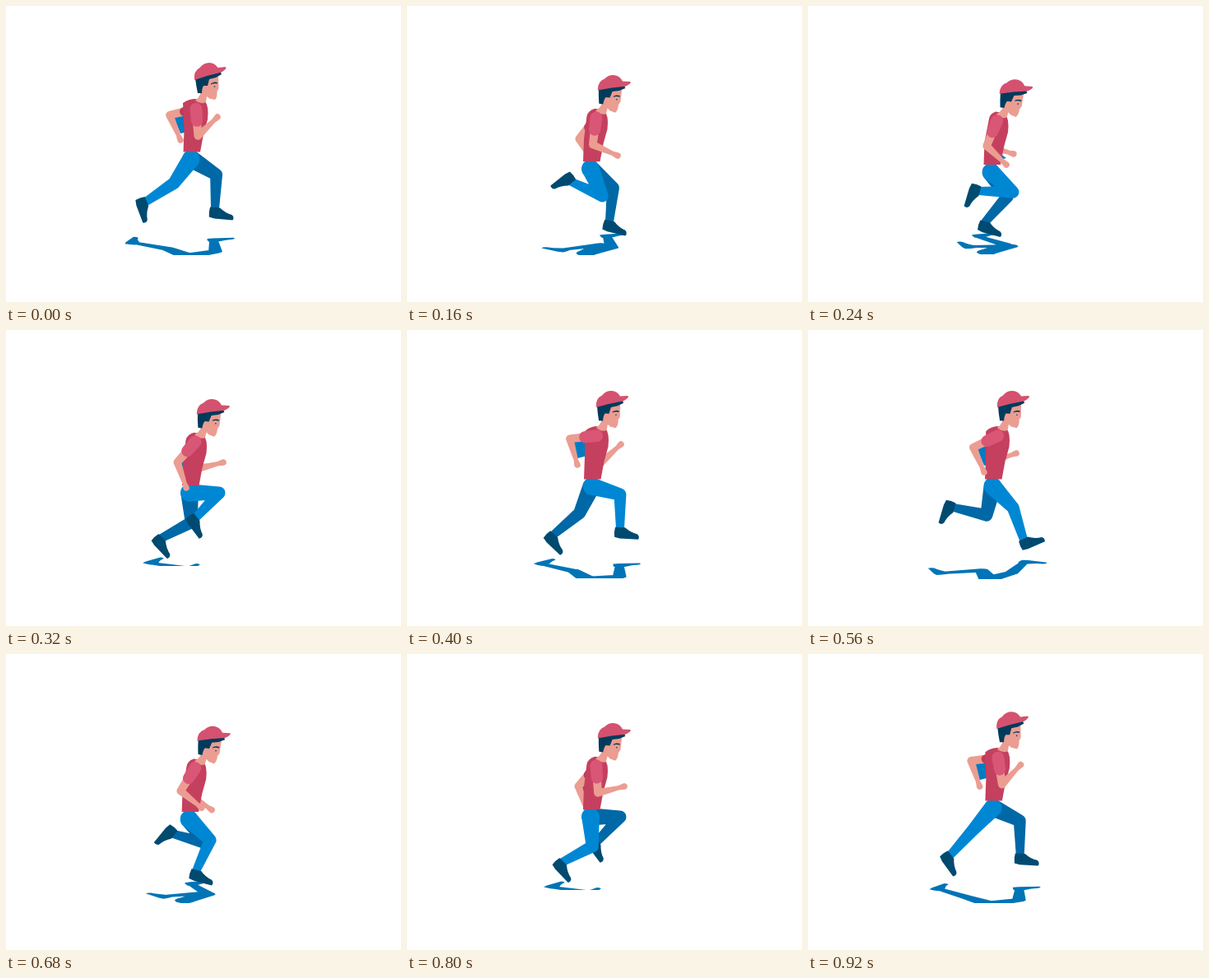
Recreate the animation shown at these times as an HTML page. Size 480 by 360 pixels, loop 0.96 s.

```html
<!DOCTYPE html>
<html lang="en">
<head>
<meta charset="utf-8">
<title>Runner</title>
<style>
html, body { margin: 0; width: 100%; height: 100%; overflow: hidden; background: #fff; }
svg { display: block; width: 100%; height: 100%; }
#nearLeg .limb { fill: var(--shade, #0087d4); }
#farLeg .limb { fill: var(--shade, #0068a6); }
.shoe { fill: var(--shade, #004a70); }
.skin { fill: #eb9d92; }
.hair { fill: #003b5c; }
#shadow { --shade: #0074b6; }
</style>
</head>
<body>
<svg viewBox="0 0 480 360">
  <clipPath id="ground"><rect id="strip" x="130" y="270" width="170"/></clipPath>
  <g id="shadow" clip-path="url(#ground)">
    <g transform="matrix(1.12 0 0 -.3 -31.8 360)"><use href="#farLeg"/><use href="#nearLeg"/></g>
  </g>
  <path id="patch" fill="#007cc4"/>
  <g id="farArm"><path class="skin"/><path fill="#bd3c59"/></g>
  <g id="farLeg"><path class="limb"/><path class="shoe"/></g>
  <g id="nearLeg"><path class="limb"/><path class="shoe"/></g>
  <path id="torso" fill="#c5405e"/>
  <g id="head">
    <path class="skin" d="M243 90L258 84L258.500 100L256.500 104Q257 111 254 114L247 112.500L244 110L243 117Q237 120 230 115Q238 109 237 98Z"/>
    <path class="hair" d="M230 88L260 79L262 83L255 87L247 89L245 97L240 97Q238 100 238 106L233 106Q231 97 230 88Z"/>
    <path class="hair" d="M249 94.500Q253 91.500 257 93L256.500 94.500Q253 93.500 249 95.500Z"/>
    <circle class="hair" cx="253.500" cy="98" r=".8"/>
    <path fill="#d4526f" d="M229 90Q227.500 79 235.500 75Q240 69 247 69Q253.500 69 257.500 75L267 74Q269 76 262 80.500Q246 84 229 90Z"/>
  </g>
  <g id="nearArm"><path class="skin"/><path fill="#d95676"/></g>
</svg>
<script>
const LOOP = 960, HALF = 480, STEP = 40, BEAT = 80;
const $ = id => document.getElementById(id);

// One pose per beat: ankle x, y and shoe angle; hand x, y
const FOOT = [
  [170, 238, 68], [177, 216, 105], [200, 214, 140], [208, 225, 105],
  [231, 228, 52], [259, 241, 2], [254, 246, 4], [262, 255, -25],
  [246, 262, 12], [215, 263, 14], [189, 253, 45], [178, 249, 42]
];
const HAND = [
  [257, 135], [253, 150], [256, 182], [241, 193], [219, 192], [207, 164],
  [212, 163], [214, 173], [226, 190], [250, 180], [264, 161], [260, 139]
];

// Smooth looping curve through the poses
function along(poses, t) {
  const n = poses.length, i = Math.floor(t / BEAT), u = t / BEAT - i;
  const [a, b, c, d] = [-1, 0, 1, 2].map(j => poses[(i + j + n) % n]);
  return b.map((p, j) => p + u / 2 * (c[j] - a[j]
    + u * (2*a[j] - 5*p + 4*c[j] - d[j] + u * (3*(p - c[j]) + d[j] - a[j]))));
}

const mix = (a, b, u) => a.map((v, i) => v + (b[i] - v) * u);
const f = v => v.toFixed(2);

// Middle joint of a two-part limb; side 1 bends forward, -1 backward
function joint(a, b, upper, lower, side) {
  const dx = b[0] - a[0], dy = b[1] - a[1], d = Math.hypot(dx, dy);
  const s = (upper*upper - lower*lower + d*d) / (2 * d);
  const h = side * Math.sqrt(Math.max(0, upper*upper - s*s));
  return [a[0] + (dx*s + dy*h) / d, a[1] + (dy*s - dx*h) / d];
}

// Limb part that narrows from radius r to radius s, with round ends
function taper([x, y], r, [p, q], s) {
  const a = Math.atan2(q - y, p - x), c = Math.cos(a), n = Math.sin(a);
  return `M${f(x + n*r)} ${f(y - c*r)}A${r} ${r} 0 0 0 ${f(x - n*r)} ${f(y + c*r)}` +
    `L${f(p - n*s)} ${f(q + c*s)}A${s} ${s} 0 0 0 ${f(p + n*s)} ${f(q - c*s)}Z`;
}

function leg(id, t, hip) {
  const [x, y, turn] = along(FOOT, t % LOOP);
  const ankle = [x, y], knee = joint(hip, ankle, 36, 41, 1);
  const [limb, shoe] = $(id).children;
  limb.setAttribute("d", taper(hip, 10.8, knee, 7.5) + taper(knee, 7.5, ankle, 5));
  shoe.setAttribute("transform", `translate(${f(x)} ${f(y)}) rotate(${f(turn)})`);
}

function arm(id, t, shoulder, sleeve) {
  const hand = along(HAND, t % LOOP), elbow = joint(shoulder, hand, 33, 33, -1);
  const wrist = mix(elbow, hand, .82);
  const [skin, cloth] = $(id).children;
  skin.setAttribute("d", taper(shoulder, 5.5, elbow, 4.8) +
    taper(elbow, 4.8, wrist, 2.6) + taper(wrist, 2.8, hand, 3.8));
  cloth.setAttribute("d", taper(shoulder, sleeve, mix(shoulder, elbow, .45), sleeve - .5));
  return { elbow, hand };
}

function draw(t) {
  // The body sinks and leans twice per loop
  const k = (1 - Math.cos(t / HALF * 2 * Math.PI)) / 1.5;
  const hip = [225 - 2 * k, 186 + 12 * k], shoulder = [231 - k, 125 + 11 * k];

  leg("farLeg", t + HALF, hip);
  leg("nearLeg", t, hip);
  const far = arm("farArm", t + HALF, shoulder, 6);
  const near = arm("nearArm", t, shoulder, 7.5);

  // Blue between the trailing arm and the back
  const { elbow: [x, y], hand } = far.elbow[0] < near.elbow[0] ? far : near;
  $("patch").setAttribute("d", `M${f(x + 4)} ${f(y)}L218 ${f(y - 5)}V${f(y + 21)}L${f(hand[0])} ${f(hand[1] - 8)}Z`);

  $("torso").setAttribute("d", `M${f(215 + 5*k)} ${f(118 + 4*k)}Q222 ${f(113 + 2*k)} 230 113L241 115` +
    `Q247 121 245 138L240 156L236 177.500H215.500L216.500 150Z`);
  $("torso").setAttribute("transform", `translate(${f(-1.5 * k)} ${f(11.7 * k)})`);
  $("head").setAttribute("transform", `translate(${f(-.5 * k)} ${f(13.5 * k)}) rotate(${f(8 * k)} 238 112)`);

  // Only a strip of ground takes the shadow; it narrows on each push-off
  const push = Math.max(0, Math.cos((t - 320) / HALF * 2 * Math.PI)) ** 4;
  $("strip").setAttribute("height", f(33 - 16 * push));
}

for (const shoe of document.querySelectorAll(".shoe"))
  shoe.setAttribute("d", "M-6 -1L6 -1Q13 5 21 6.500Q24.500 9 22.500 13L0 12.500L-6.500 11Q-7.500 5 -6 -1Z");

const start = performance.now();
function tick() {
  const t = (performance.now() - start) % LOOP;
  draw(Math.floor(t / STEP) * STEP);
  requestAnimationFrame(tick);
}
draw(0);
requestAnimationFrame(tick);
</script>
</body>
</html>
```
